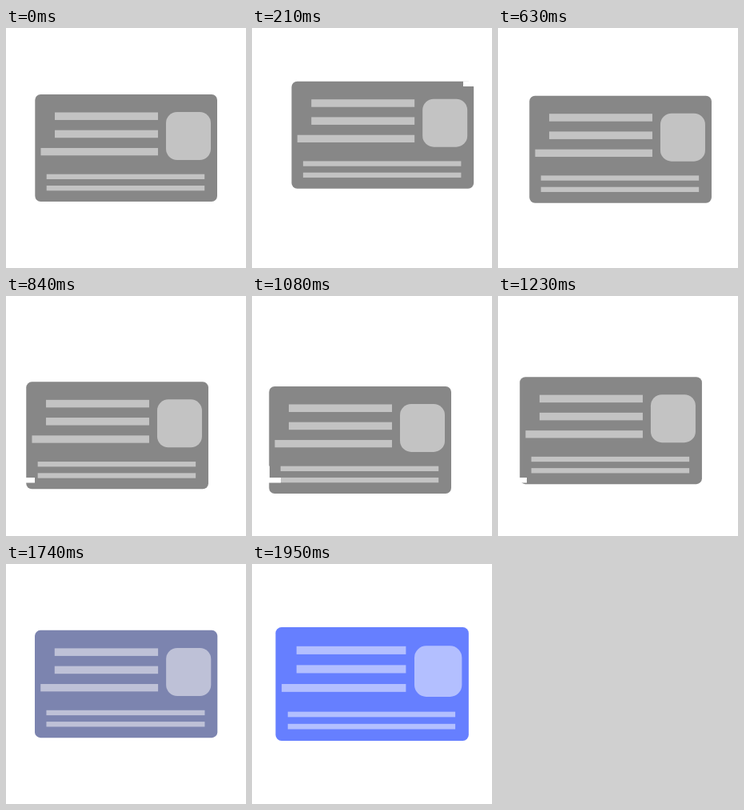
An HTML page that plays this animation: 300x300 px, repeating every 3600 ms.

```html
<!DOCTYPE html>
<html lang="en">
<head>
<meta charset="utf-8">
<title>Card</title>
<style>
  html, body { margin: 0; width: 100%; height: 100%; overflow: hidden; background: #fff; }
  svg { display: block; width: 100%; height: 100%; }
</style>
</head>
<body>
<svg viewBox="0 0 300 300">
  <g id="card">
    <rect id="base" x="36.3" y="83" width="227.7" height="134" rx="7"/>
    <g fill="#fff" fill-opacity=".5">
      <rect x="61" y="105.5" width="129" height="9.5"/>
      <rect x="61" y="127.7" width="129" height="9.5"/>
      <rect x="43.5" y="150" width="146.5" height="9.3"/>
      <rect x="50.7" y="182.7" width="197.5" height="6.3"/>
      <rect x="50.7" y="197" width="197.5" height="6.3"/>
      <rect x="200" y="105" width="56" height="60" rx="14"/>
    </g>
  </g>
  <!-- fixed white notches that cut into the card when it drifts under them -->
  <path fill="#fff" d="M264 66.5H284V87.5H278V73H264Z M36 233.5H16V212.5H22V227H36Z"/>
</svg>
<script>
const LOOP = 3600, STEP = 30;
const GRAY = [135, 135, 135], BLUE = [102, 127, 255];
const card = document.getElementById('card');
const base = document.getElementById('base');

// Each leg: start and end time, start and end offset, slopes at both ends.
const legs = [
  { t0: 0, t1: 303, from: [0, 0], to: [17, -21], slopeIn: 0, slopeOut: 0 },
  { t0: 303, t1: 975, from: [17, -21], to: [-17, 34], slopeIn: 0, slopeOut: 0.55 },
  { t0: 975, t1: 1530, from: [-17, 34], to: [0, 0], slopeIn: 0.2, slopeOut: 0 }
];

const mix = (a, b, u) => a + (b - a) * u;
const progress = (t, t0, t1) => Math.min(1, Math.max(0, (t - t0) / (t1 - t0)));
const hermite = (u, a = 0, b = 0) =>
  u * u * (3 - 2 * u) + a * u * (1 - u) ** 2 - b * u * u * (1 - u);

function offsetAt(t) {
  const leg = legs.find(l => t < l.t1);
  if (!leg) return [0, 0];
  const u = hermite(progress(t, leg.t0, leg.t1), leg.slopeIn, leg.slopeOut);
  return leg.from.map((v, i) => mix(v, leg.to[i], u));
}

function draw(t) {
  const [x, y] = offsetAt(t);
  const u = progress(t, 1710, 1950);
  const scale = mix(1, 1.06, hermite(u));
  const tint = 1 - (1 - u) ** 3;
  card.setAttribute('transform',
    `translate(${150 + x} ${150 + y}) scale(${scale}) translate(-150 -150)`);
  base.setAttribute('fill', `rgb(${GRAY.map((v, i) => Math.round(mix(v, BLUE[i], tint)))})`);
}

const start = performance.now();
function tick() {
  const t = (performance.now() - start) % LOOP;
  draw(Math.floor(t / STEP) * STEP);
  requestAnimationFrame(tick);
}
tick();
</script>
</body>
</html>
```
